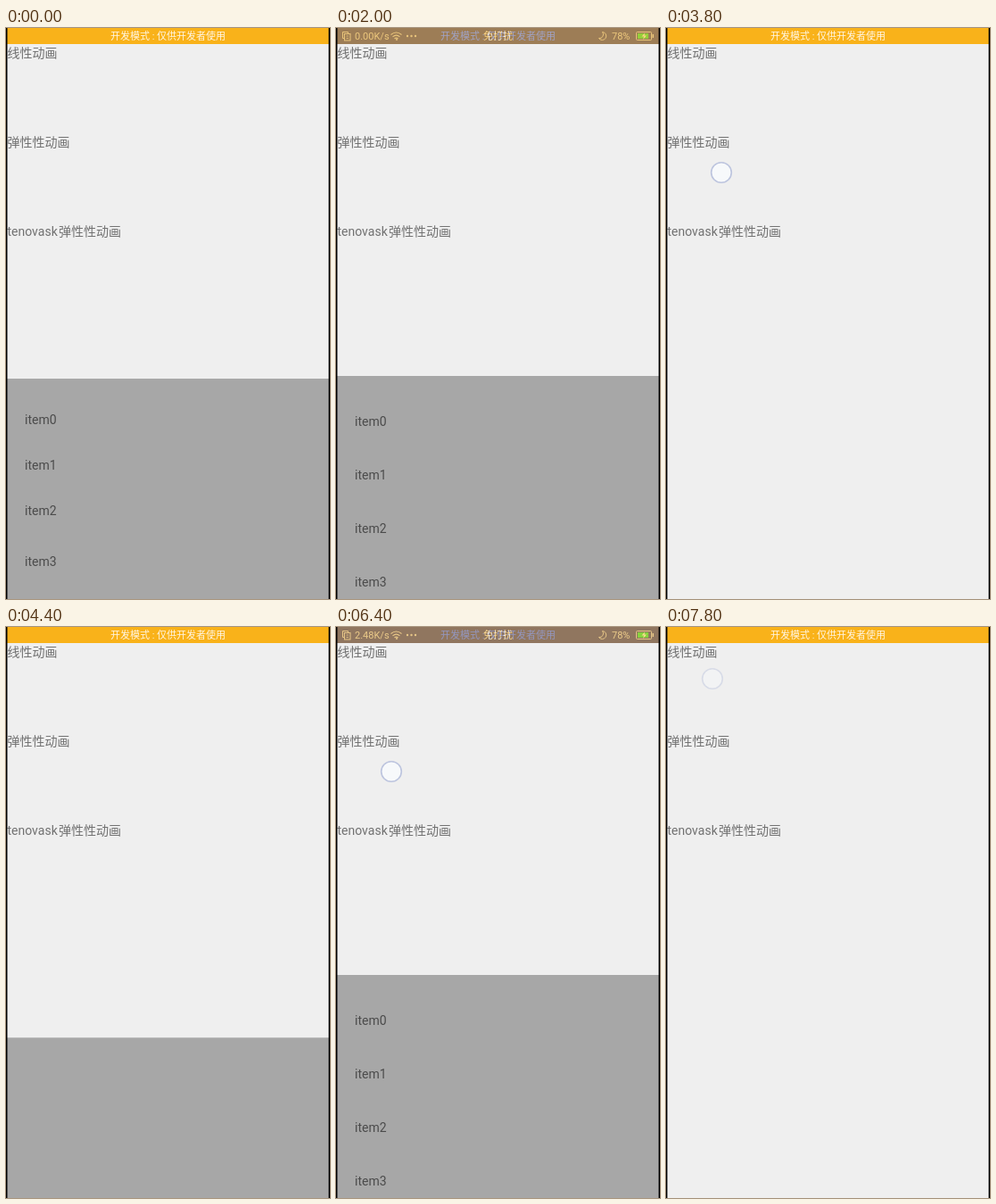
An HTML page that plays this animation: 363x640 px, repeating every 8 s.

```html
<!DOCTYPE html>
<html lang="zh">
<head>
<meta charset="utf-8">
<style>
  html, body { margin: 0; width: 100%; height: 100%; overflow: hidden; background: #efefef; }
  svg { display: block; width: 100vw; height: 100vh; }
  text { font-family: Roboto, "Noto Sans CJK SC", "Noto Sans CJK", sans-serif; }
  .label { font-size: 14px; fill: #717171; }
  .item { font-size: 14px; fill: #4b4b4b; }
  .dev { font-size: 11px; fill: #fff6e4; }
  .status { font-size: 11px; fill: #fff; }
  .line { fill: none; stroke: #fff; }
</style>
</head>
<body>
<svg viewBox="0 0 363 640" xmlns="http://www.w3.org/2000/svg">
  <defs>
    <clipPath id="clip"><rect id="clipRect" width="363" height="640"/></clipPath>
  </defs>
  <rect width="363" height="640" fill="#efefef"/>
  <g class="label">
    <text x="1.5" y="33">线性动画</text>
    <text x="1.5" y="133">弹性性动画</text>
    <text x="1.5" y="233">tenovask</text>
    <text x="59" y="233">弹性性动画</text>
  </g>
  <rect id="panel" width="363" height="640" fill="#a7a7a7"/>
  <g id="items" class="item" clip-path="url(#clip)"></g>
  <circle id="touch" r="11.3" fill="#f7f9fb" stroke="#bcc4de" stroke-width="1.6"/>

  <rect width="363" height="18" fill="#f9b21a"/>
  <text class="dev" x="181.5" y="13" text-anchor="middle">开发模式 : 仅供开发者使用</text>
  <g id="bar">
    <rect width="363" height="18" fill="#303f9f"/>
    <g class="line" opacity=".8">
      <path d="M9.5 11.5H7.5V4.5H13.5V6"/>
      <rect x="9.5" y="6.5" width="6.5" height="7.5"/>
      <path d="M11.5 9H14M11.5 11.5H14" stroke-width=".8"/>
      <path d="M61.5 7.5Q67.5 2.5 73.5 7.5M63.5 9.8Q67.5 6.5 71.5 9.8M65.5 12Q67.5 10.3 69.5 12" stroke-width="1.1"/>
      <path d="M298.5 4.5A4.3 4.3 0 0 1 294.5 11.5A4.5 4.5 0 1 0 298.5 4.5Z"/>
      <rect x="336.5" y="4.5" width="17" height="9" rx="1"/>
      <path d="M355.2 7V11" stroke-width="1.5"/>
    </g>
    <g fill="#fff" opacity=".8">
      <circle cx="68" cy="13" r="1"/>
      <circle cx="80" cy="9" r="1.2"/><circle cx="84.5" cy="9" r="1.2"/><circle cx="89" cy="9" r="1.2"/>
    </g>
    <rect x="338" y="6" width="12" height="6" fill="#20f060"/>
    <path d="M346 5.5L342.5 9.5H345L344 13L348 8.5H345.5Z" fill="#fff"/>
    <g class="status">
      <text id="speed" x="21" y="13" opacity=".85"></text>
      <text x="181.5" y="13" text-anchor="middle">免打扰</text>
      <text x="309" y="13" opacity=".85">78%</text>
    </g>
  </g>
  <path d="M0 0H1.5V640H0ZM361.5 0H363V640H361.5Z" fill="#000"/>
</svg>
<script>
const LOOP = 8000, STEP = 200, OPEN = 390, CLOSED = 640, ROWS = 4;
const OVERSHOOT = [0.91, 1.27, 1.6, 1.74];
const $ = id => document.getElementById(id);
const ramp = (t, start, dur) => Math.min(1, Math.max(0, (t - start) / dur));
const outQuad = u => 1 - (1 - u) ** 2;
const inOut = u => u < 0.5 ? 2 * u * u : 1 - 2 * (1 - u) ** 2;
const outBack = (u, s) => 1 + (s + 1) * (u - 1) ** 3 + s * (u - 1) ** 2;

const shows = [
  { from: 0, panel: [-1618, 1818], rise: -609, hide: 2786, fadeIn: 130, fadeOut: 1380, speed: "0.00K/s" },
  { from: 3600, panel: [4050, 745], rise: 4518, hide: 6560, fadeIn: 4580, fadeOut: 5850, speed: "2.48K/s" }
];
// time, x, y of each tap
const taps = [[2600, 52, 58], [3800, 62, 162], [6400, 62, 162], [7600, 52, 58]];

const rows = Array.from({ length: ROWS }, (_, i) => {
  const row = document.createElementNS("http://www.w3.org/2000/svg", "text");
  row.textContent = "item" + i;
  row.setAttribute("x", 21);
  $("items").append(row);
  return row;
});

function drawTouch(t) {
  const tap = taps.find(([at]) => t >= at && t < at + 2 * STEP);
  $("touch").setAttribute("opacity", tap ? (t < tap[0] + STEP ? 1 : 0.45) : 0);
  if (tap) {
    $("touch").setAttribute("cx", tap[1]);
    $("touch").setAttribute("cy", tap[2]);
  }
}

function draw(t) {
  const show = t < shows[1].from ? shows[0] : shows[1];
  const travel = CLOSED - OPEN;
  const slide = travel * inOut(ramp(t, show.hide, 414));
  const top = OPEN + travel * (1 - outQuad(ramp(t, ...show.panel))) + slide;
  $("panel").setAttribute("y", top);
  $("clipRect").setAttribute("y", top);

  const u = ramp(t, show.rise, 1050);
  rows.forEach((row, i) => {
    const offset = travel * (1 - outBack(u, OVERSHOOT[i]));
    row.setAttribute("y", top + 55.5 + 60 * i + offset);
  });

  const alpha = ramp(t, show.fadeIn, 1000) * (1 - ramp(t, show.fadeOut, 1140));
  $("bar").setAttribute("opacity", alpha);
  $("speed").textContent = show.speed;
  drawTouch(t);
}

const begin = performance.now();
function tick() {
  const t = (performance.now() - begin) % LOOP;
  draw(Math.floor(t / STEP) * STEP);
  requestAnimationFrame(tick);
}
tick();
</script>
</body>
</html>
```
